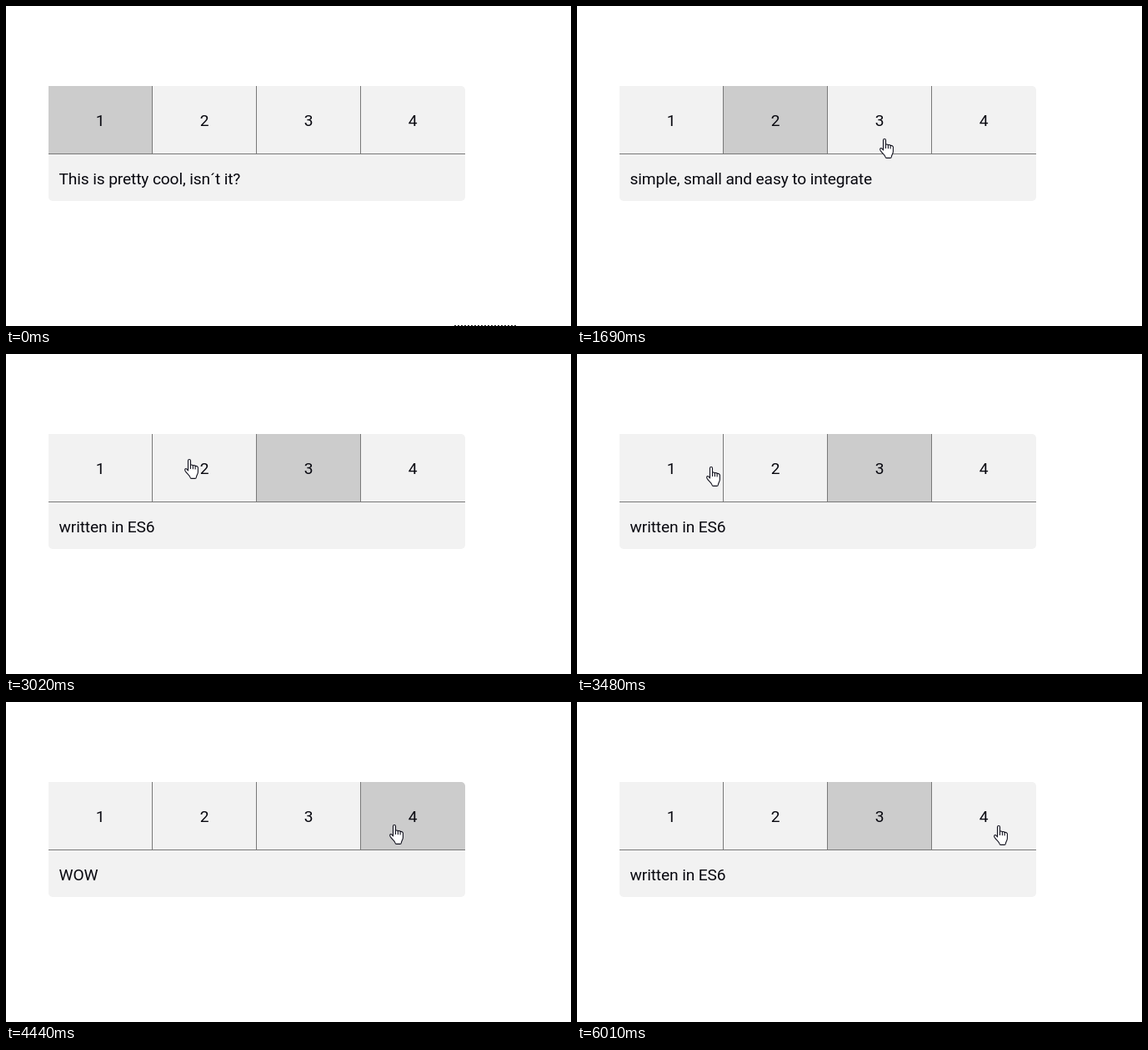
An HTML page that plays this animation: 678 px wide and 384 px high, repeating every 6250 ms.

```html
<!DOCTYPE html>
<html lang="en">
<head>
<meta charset="utf-8">
<title>Tabs</title>
<style>
  html, body { margin: 0; width: 100%; height: 100%; overflow: hidden; background: #fff; }
  svg { display: block; width: 678px; height: 384px; }
  text { font: 19.2px Roboto, sans-serif; letter-spacing: -.13px; fill: #08080f; }
  .digit { text-anchor: middle; }
  .cursor path { fill: #fff; stroke: #10101c; stroke-width: 1.1; stroke-linejoin: round; stroke-linecap: round; }
  .cursor .line { fill: none; }
</style>
</head>
<body>
<svg viewBox="0 0 678 384">
  <clipPath id="round"><path d="M51 96H546a5 5 0 0 1 5 5V229a5 5 0 0 1-5 5H56a5 5 0 0 1-5-5Z"/></clipPath>
  <g clip-path="url(#round)">
    <rect x="51" y="96" width="500" height="138" fill="#f2f2f2"/>
    <rect id="active" y="96" width="125" height="81" fill="#ccc"/>
    <path d="M175.500 96V177M300.500 96V177M425.500 96V177M51 177.500H551" stroke="#787878" fill="none"/>
  </g>
  <g id="digits"></g>
  <text id="label" x="63.5" y="214"></text>
  <path id="link" d="M538 383.500H612" stroke="#222" stroke-dasharray="2 2"/>
  <g id="cursor" class="cursor">
    <path id="arrow" d="M.5.5V16L4.200 12.600 6.500 18 9 17 6.700 11.700H11.500Z"/>
    <g id="hand">
      <path d="M4.500 14V2a1.500 1.500 0 0 1 3 0V7.300q1.600-.9 2.900.5 1.600-.7 2.700.6 2.200-.4 3.300 1.600V15.500c0 2.700-1.700 3.900-2 6.200q-.2 1.700-1.600 1.700H8.600q-1.400 0-1.600-1.400C6.500 19.700 3 17.800 1 14.200 0 12.300 1.500 10.900 2.900 12Z"/>
      <path class="line" d="M7.500 7.300V11.500M10.400 7.800V11.700M13.100 8.400V11.900"/>
    </g>
  </g>
</svg>
<script>
const LOOP = 6250;
const LABELS = [
  "This is pretty cool, isn´t it?",
  "simple, small and easy to integrate",
  "written in ES6",
  "WOW"
];

// [time, tab]
const CLICKS = [[0, 0], [1290, 1], [1840, 2], [3570, 0], [4440, 3], [5550, 2]];

// Pointer moves: first step, last step, step count, end point, optional bend
const START = [590, 400];
const MOVES = [
  { from: 660, to: 1210, steps: 8, end: [215, 155], bend: [30, 190] },
  { from: 1530, to: 1690, steps: 3, end: [363, 159] },
  { from: 1920, to: 2160, steps: 4, end: [186, 143] },
  { from: 2310, to: 2540, steps: 4, end: [362, 128] },
  { from: 2700, to: 3020, steps: 5, end: [214, 126], bend: [280, 117] },
  { from: 3180, to: 3500, steps: 5, end: [140, 137] },
  { from: 3800, to: 4030, steps: 4, end: [460, 147] },
  { from: 5070, to: 5220, steps: 3, end: [361, 148] },
  { from: 5950, to: 6010, steps: 2, end: [500, 148] }
];

const el = id => document.getElementById(id);
const mix = (a, b, u) => a + (b - a) * u;

el("digits").innerHTML = LABELS.map((_, i) =>
  `<text class="digit" x="${113 + 125 * i}" y="144">${i + 1}</text>`).join("");

function pointerAt(t) {
  let pos = START;
  for (const { from, to, steps, end, bend } of MOVES) {
    if (t < from) break;
    const step = Math.floor((t - from) / (to - from) * (steps - 1) + .02) + 1;
    const u = Math.min(1, step / steps);
    const start = pos;
    pos = end.map((e, i) => {
      const mid = bend ? bend[i] : mix(start[i], e, .5);
      return mix(mix(start[i], mid, u), mix(mid, e, u), u);
    });
    if (u < 1) break;
  }
  return pos.map(Math.round);
}

function draw(t) {
  const tab = CLICKS.filter(c => c[0] <= t).pop()[1];
  el("active").setAttribute("x", 51 + 125 * tab);
  if (el("label").textContent !== LABELS[tab]) el("label").textContent = LABELS[tab];

  const [x, y] = pointerAt(t);
  const overTabs = y < 177;
  el("cursor").setAttribute("transform", `translate(${x} ${y})`);
  el("hand").style.display = overTabs ? "" : "none";
  el("arrow").style.display = overTabs ? "none" : "";
  el("link").style.display = t < MOVES[0].from ? "" : "none";
}

function tick() {
  draw(performance.now() % LOOP);
  requestAnimationFrame(tick);
}
tick();
</script>
</body>
</html>
```
